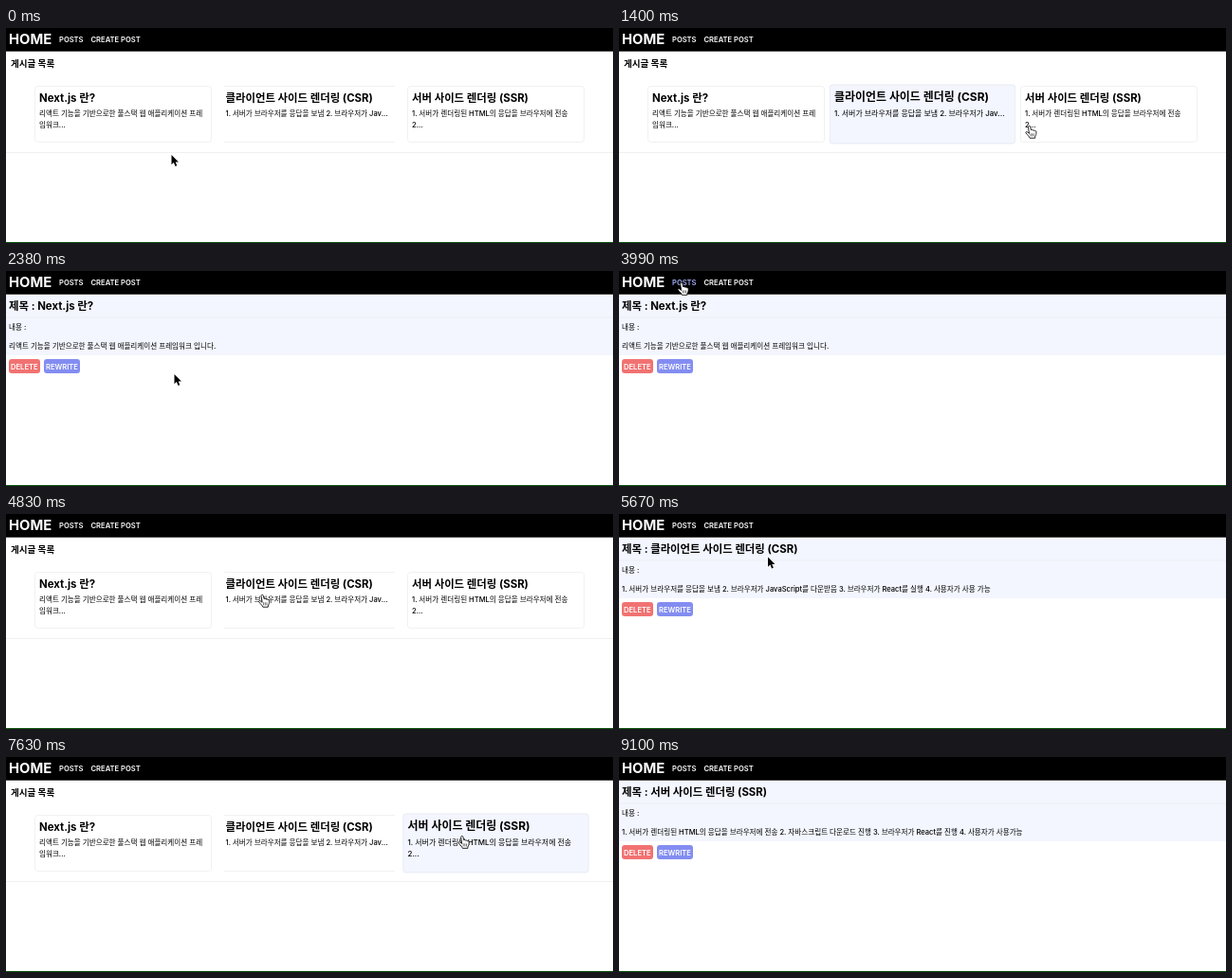
Write an HTML page that moves like this. It is 640 px wide and 227 px high and loops after 9170 ms.

```html
<!DOCTYPE html>
<html lang="ko">
<head>
<meta charset="utf-8">
<title>게시글</title>
<style>
  html, body { margin: 0; width: 100%; height: 100%; overflow: hidden; background: #fff; }
  svg { display: block; width: 640px; height: 227px; }
  text {
    font: 500 7.57px Inter, "Noto Sans CJK KR", "Noto Sans CJK JP", "Noto Sans CJK", sans-serif;
    fill: #000;
    white-space: pre;
  }
  .title { font-size: 11.4px; font-weight: 700; }
  .list-title { font-size: 9.55px; font-weight: 700; }
  .home { font-size: 14.8px; font-weight: 700; fill: #fff; }
  .label { font-size: 7.6px; font-weight: 600; fill: #fff; }
</style>
</head>
<body>
<svg viewBox="0 0 640 227">
  <rect width="640" height="227" fill="#fff"/>
  <g id="list">
    <text class="list-title" x="5" y="41.3">게시글 목록</text>
    <g id="cards"></g>
    <rect y="131" width="640" height="1" fill="#f0f0f0"/>
  </g>
  <g id="detail">
    <rect y="25" width="640" height="64" fill="#f3f6fe"/>
    <rect y="48.5" width="640" height="1" fill="#ebeff6"/>
    <text id="heading" class="title" x="3" y="41.2"></text>
    <text x="3" y="62">내용 :</text>
    <text id="content" x="3" y="82"></text>
    <rect x="3" y="93" width="33" height="15" rx="3" fill="#f17272"/>
    <text class="label" x="5" y="103.8">DELETE</text>
    <rect x="40" y="93" width="38" height="15" rx="3" fill="#838df1"/>
    <text class="label" x="42" y="103.8">REWRITE</text>
  </g>
  <rect width="640" height="24.7" fill="#000"/>
  <text class="home" x="3" y="17.4">HOME</text>
  <text id="posts" class="label" x="56" y="15">POSTS</text>
  <text class="label" x="89.5" y="15">CREATE POST</text>
  <rect y="226" width="640" height="1" fill="#0a500a"/>
  <g id="cursor">
    <path id="arrow" d="M0 0V10.3L2.4 8.1 4 12 5.8 11.2 4.2 7.5H7.4Z" stroke="#fff" stroke-width="1.2" paint-order="stroke"/>
    <g id="hand" transform="translate(-.4 -.4) scale(.95)" fill="#fff" stroke="#000" stroke-width=".9" stroke-linejoin="round" stroke-linecap="round">
      <path d="M-1 .8C-1-.6 1.2-.6 1.4.8L2.2 4.4C3 3.8 4 4 4.3 4.9 5 4.4 6 4.7 6.3 5.5 7.2 5 8 5.6 8 6.7 8 9 7.6 10.2 6.6 12V13.4H.8C.4 11.8-1.6 10.2-3.6 7.6-4 6.5-2.8 6-1.9 6.7L-.2 8Z"/>
      <path d="M1.6 8.6V11M3.4 8.6V11M5.2 8.6V11" fill="none" stroke-width=".6"/>
    </g>
  </g>
</svg>
<script>
const LOOP = 9170, STEP = 70, HIDE_AT = 8890;
const $ = id => document.getElementById(id);

const posts = [
  {
    title: 'Next.js 란?',
    excerpt: ['리액트 기능을 기반으로한 풀스택 웹 애플리케이션 프레', '임워크...'],
    body: '리액트 기능을 기반으로한 풀스택 웹 애플리케이션 프레임워크 입니다.'
  },
  {
    title: '클라이언트 사이드 렌더링 (CSR)',
    excerpt: ['1. 서버가 브라우저를 응답을 보냄 2. 브라우저가 Jav...'],
    body: '1. 서버가 브라우저를 응답을 보냄 2. 브라우저가 JavaScript를 다운받음 3. 브라우저가 React를 실행 4. 사용자가 사용 가능'
  },
  {
    title: '서버 사이드 렌더링 (SSR)',
    excerpt: ['1. 서버가 렌더링된 HTML의 응답을 브라우저에 전송', '2...'],
    body: '1. 서버가 렌더링된 HTML의 응답을 브라우저에 전송 2. 자바스크립트 다운로드 진행 3. 브라우저가 React를 진행 4. 사용자가 사용가능'
  }
];

// Each click switches between the list and the next post
const clicks = [2310, 4200, 5390, 6440, 7700];

// Pointer moves: start, end, and the place it comes to rest
const home = { x: 174.5, y: 134 }, nav = { x: 66, y: 13 };
const moves = [
  { from: 350, to: 1260, x: 390, y: 100 },
  { from: 1260, to: 1680, x: 467, y: 107 },
  { from: 1680, to: 2100, x: 177.5, y: 109 },
  { from: 2940, to: 3850, ...nav },
  { from: 4550, to: 4970, x: 296, y: 95 },
  { from: 5340, to: 6230, ...nav },
  { from: 6510, to: 7210, x: 481, y: 84 },
  { from: 7910, to: 8820, x: 236, y: 207 }
];

const clamp = v => Math.max(0, Math.min(1, v));
const easeOut = u => 1 - (1 - u) ** 2;
const lerp = (a, b, k) => a + (b - a) * k;
const mix = (a, b, k) => `rgb(${a.map((v, i) => Math.round(lerp(v, b[i], k)))})`;

function pointer(t) {
  return moves.reduce((p, m) => {
    const k = easeOut(clamp((t - m.from) / (m.to - m.from)));
    return { x: lerp(p.x, m.x, k), y: lerp(p.y, m.y, k) };
  }, home);
}

function pageAt(t) {
  const n = clicks.filter(c => c <= t).length;
  return n % 2 ? (n - 1) / 2 : -1;
}

function add(parent, name, attrs, label = '') {
  const el = document.createElementNS('http://www.w3.org/2000/svg', name);
  for (const key in attrs) el.setAttribute(key, attrs[key]);
  el.textContent = label;
  return parent.appendChild(el);
}

const cards = posts.map((post, i) => {
  const x = 30.5 + 196.5 * i;
  const area = { x, y: 61.5, width: 186, height: 59 };
  const group = add($('cards'), 'g', {});
  const box = add(group, 'rect', { ...area, rx: 3 });
  add(group, 'text', { class: 'title', x: x + 4.5, y: 78 }, post.title);
  post.excerpt.forEach((line, row) => add(group, 'text', { x: x + 4.5, y: 92.5 + 12 * row }, line));
  return { area, group, box, cx: x + 93 };
});
const navArea = { x: 56, y: 8, width: 26, height: 10 };

function over(area, t) {
  if (area !== navArea && pageAt(t) >= 0) return false;
  const { x, y } = pointer(t);
  return x >= area.x && x <= area.x + area.width && y >= area.y && y <= area.y + area.height;
}

// Hover styles trail the pointer and fade over two steps
const hover = (area, t) => (over(area, t - 2 * STEP) + over(area, t - 3 * STEP)) / 2;

const show = (el, on) => el.setAttribute('visibility', on ? 'visible' : 'hidden');

function render(time) {
  const t = Math.floor(time % LOOP / STEP) * STEP;
  const page = pageAt(t), isList = page < 0;

  $('list').style.display = isList ? '' : 'none';
  $('detail').style.display = isList ? 'none' : '';
  if (!isList) {
    $('heading').textContent = '제목 : ' + posts[page].title;
    $('content').textContent = posts[page].body;
  }

  cards.forEach(({ area, group, box, cx }, i) => {
    const k = hover(area, t);
    group.setAttribute('transform', `translate(${cx} 91) scale(${1 + .05 * k}) translate(${-cx} -91)`);
    box.setAttribute('fill', mix([255, 255, 255], [243, 246, 254], k));
    box.setAttribute('stroke', mix([241, 241, 241], [232, 236, 246], k));
    // The middle card shows its side borders only on hover
    box.setAttribute('stroke-dasharray', i === 1 && !k ? '180 62.4' : 'none');
  });
  $('posts').style.fill = mix([255, 255, 255], [165, 175, 246], hover(navArea, t));

  const { x, y } = pointer(t);
  const pointing = [navArea, ...cards.map(c => c.area)].some(area => over(area, t));
  show($('arrow'), !pointing && t < HIDE_AT);
  show($('hand'), pointing && t < HIDE_AT);
  $('cursor').setAttribute('transform', `translate(${x} ${y})`);
}

const begin = performance.now();
function tick() {
  render(performance.now() - begin);
  requestAnimationFrame(tick);
}
tick();
</script>
</body>
</html>
```
